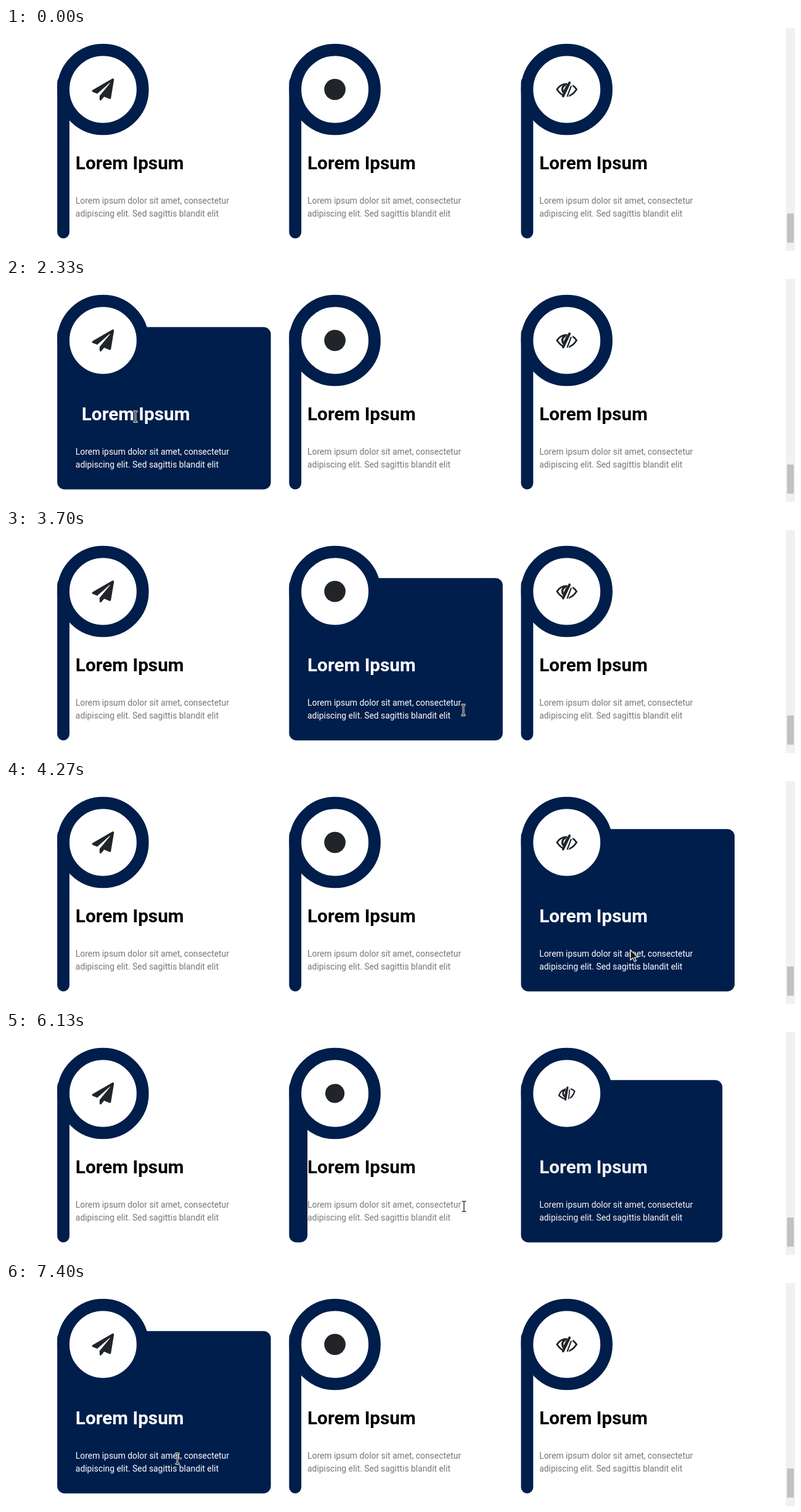
Recreate the animation shown at these times as an HTML page. Size 1280 by 363 pixels, loop 9.01 s.

```html
<!DOCTYPE html>
<html lang="en">
<head>
<meta charset="utf-8">
<title>Hover cards</title>
<style>
  html, body { margin: 0; width: 100%; height: 100%; overflow: hidden; background: #fff; }
  #page { position: absolute; left: 0; top: 0; width: 1293px; height: 367px; overflow: hidden;
    transform: scale(calc(1280 / 1293)); transform-origin: 0 0; font-family: Roboto, sans-serif; }
  #page *, #pointer { position: absolute; margin: 0; }
  .bar { left: 0; top: 79px; height: 267px; border-radius: 12px; background: #001e4b; }
  .ring { left: 0; top: 26px; width: 110px; height: 110px; border: 20px solid #001e4b; border-radius: 50%; background: #fff; }
  .icon { left: 57px; top: 83px; width: 36px; height: 36px; overflow: visible; }
  h2 { left: 30px; top: 204px; font-size: 30px; line-height: 35px; font-weight: 700; white-space: nowrap; }
  p { left: 30px; top: 274px; font-size: 14px; line-height: 21px; white-space: nowrap; }
  .track { right: 0; top: 0; width: 15px; height: 100%; background: #f1f1f1; }
  .thumb { right: 2px; top: 305px; width: 11px; height: 48px; background: #c1c1c1; }
  #pointer { left: 0; top: 0; width: 1px; height: 1px; overflow: visible; }
</style>
</head>
<body>
<div id="page">
  <div class="track"></div>
  <div class="thumb"></div>
</div>
<svg id="pointer">
  <path d="M0 0V16.5L4 13L6.8 19L9.4 17.8L6.7 12H12Z" fill="#111" stroke="#fff" stroke-width="1.2"/>
  <g fill="none">
    <path id="beam" d="M-3.5 -8.5H-1L0 -7.5L1 -8.5H3.5M0 -7.5V7.5M-3.5 8.5H-1L0 7.5L1 8.5H3.5" stroke="#fff" stroke-width="3"/>
    <use href="#beam" style="display:none"/>
    <path d="M-3.5 -8.5H-1L0 -7.5L1 -8.5H3.5M0 -7.5V7.5M-3.5 8.5H-1L0 7.5L1 8.5H3.5" stroke="#111" stroke-width="1.2"/>
  </g>
</svg>
<script>
const LOOP = 9010, DURATION = 500, SETTLED = 7400, ICON_LEAD = 16;
const LEFT = 84, PITCH = 380, NARROW = 20, WIDE = 350, NUDGE = 10;
const SCALE = 1280 / 1293;
const INK = '#212529';

const plane = `<path transform="translate(-18 -18) scale(.0703)" fill="${INK}"
  d="M476 3L12 271c-18 10-16 36 2 43L121 358L408 105c5-5 13 3 9 8L176 407v81c0 23 28 33 42 15L282 426L407 478c14 6 30-3 33-18L512 28C515 8 493-7 476 3Z"/>`;
const disc = `<circle r="17.5" fill="${INK}"/>`;
const eye = `<g fill="none" stroke="${INK}" stroke-linecap="round">
  <path d="M-16 0C-9 -12 9 -12 16 0C10 9 4 11 0 11C-6 11 -12 6 -16 0Z" stroke-width="2.8"/>
  <path d="M-3 -7C-9 -4 -8 4 -4 6" stroke-width="3.4"/>
  <path d="M7 -13L-2 13" stroke="#fff" stroke-width="9" stroke-linecap="butt"/>
  <path d="M4.5 -11L-6 11M1 -6L-4 4" stroke-width="4"/>
  <path d="M7 -5L1 11" stroke-width="2.2"/></g>`;

// alternating on/off times: card hover, heading hover
const specs = [
  { icon: plane, hovers: [853, 2747, 6922], nudges: [1830, 2660] },
  { icon: disc, hovers: [2747, 3740, 6068, 6868], nudges: [] },
  { icon: eye, hovers: [3755, 6045], nudges: [4500, 5430] }
];

// pointer moves: start, end, x, y
const moves = [
  [430, 430, 10, 183],
  [810, 1270, 231, 276],
  [1570, 2000, 210, 224],
  [2630, 3030, 598, 303],
  [3400, 4270, 1013, 275],
  [4370, 4700, 975, 224],
  [5330, 6130, 743, 284],
  [6130, 6970, 337, 284],
  [6970, 7130, 278, 286]
];

const page = document.getElementById('page');
const pointer = document.getElementById('pointer');
const [arrow, beam] = pointer.children;

const cards = specs.map((spec, i) => {
  const el = document.createElement('div');
  el.style.left = LEFT + PITCH * i + 'px';
  el.innerHTML = `<div class="bar"></div><div class="ring"></div>
    <svg class="icon" viewBox="-18 -18 36 36"><g>${spec.icon}</g></svg>
    <h2>Lorem Ipsum</h2>
    <p>Lorem ipsum dolor sit amet, consectetur<br>adipiscing elit. Sed sagittis blandit elit</p>`;
  page.append(el);
  const find = s => el.querySelector(s);
  return { ...spec, bar: find('.bar'), art: find('.icon g'), title: find('h2'), text: find('p') };
});

const clamp = x => Math.min(1, Math.max(0, x));
const mix = (a, b, f) => a + (b - a) * f;

// cubic-bezier(.42, 0, .58, 1)
function easeInOut(x) {
  if (x <= 0 || x >= 1) return clamp(x);
  let lo = 0, hi = 1;
  for (let i = 0; i < 20; i++) {
    const s = (lo + hi) / 2, r = 1 - s;
    if (3 * r * r * s * .42 + 3 * r * s * s * .58 + s * s * s < x) lo = s; else hi = s;
  }
  return lo * lo * (3 - 2 * lo);
}

const level = (times, t) =>
  times.reduce((sum, start, i) => sum + (i % 2 ? -1 : 1) * easeInOut((t - start) / DURATION), 0);

function grey(from, p) {
  const v = Math.round(mix(from, 255, p));
  return `rgb(${v},${v},${v})`;
}

function drawCard(card, t) {
  const p = level(card.hovers, t), q = level(card.hovers, t + ICON_LEAD);
  card.bar.style.width = mix(NARROW, WIDE, p) + 'px';
  card.art.setAttribute('transform', `rotate(${180 * q}) scale(${1 - 2 * q})`);
  card.title.style.color = grey(0, p);
  card.title.style.left = 30 + NUDGE * level(card.nudges, t) + 'px';
  card.text.style.color = grey(119, p);
}

function overText(x, y) {
  const local = (x / SCALE - LEFT) % PITCH;
  return local > 30 && local < 290 && (y > 205 && y < 239 || y > 275 && y < 315);
}

function drawPointer(t) {
  const i = moves.findLastIndex(move => move[0] <= t);
  pointer.style.display = i < 0 ? 'none' : '';
  if (i < 0) return;
  const [start, end, toX, toY] = moves[i];
  const [, , fromX, fromY] = moves[Math.max(0, i - 1)];
  const f = end > start ? clamp((t - start) / (end - start)) : 1;
  const x = Math.round(mix(fromX, toX, f)), y = Math.round(mix(fromY, toY, f));
  const typing = overText(x, y);
  pointer.style.transform = `translate(${x}px,${y}px)`;
  arrow.style.display = typing ? 'none' : '';
  beam.style.display = typing ? '' : 'none';
}

const begin = performance.now();
function tick() {
  let t = (performance.now() - begin) % LOOP;
  if (t >= SETTLED) t = LOOP;
  cards.forEach(card => drawCard(card, t));
  drawPointer(t);
  requestAnimationFrame(tick);
}
tick();
</script>
</body>
</html>
```
